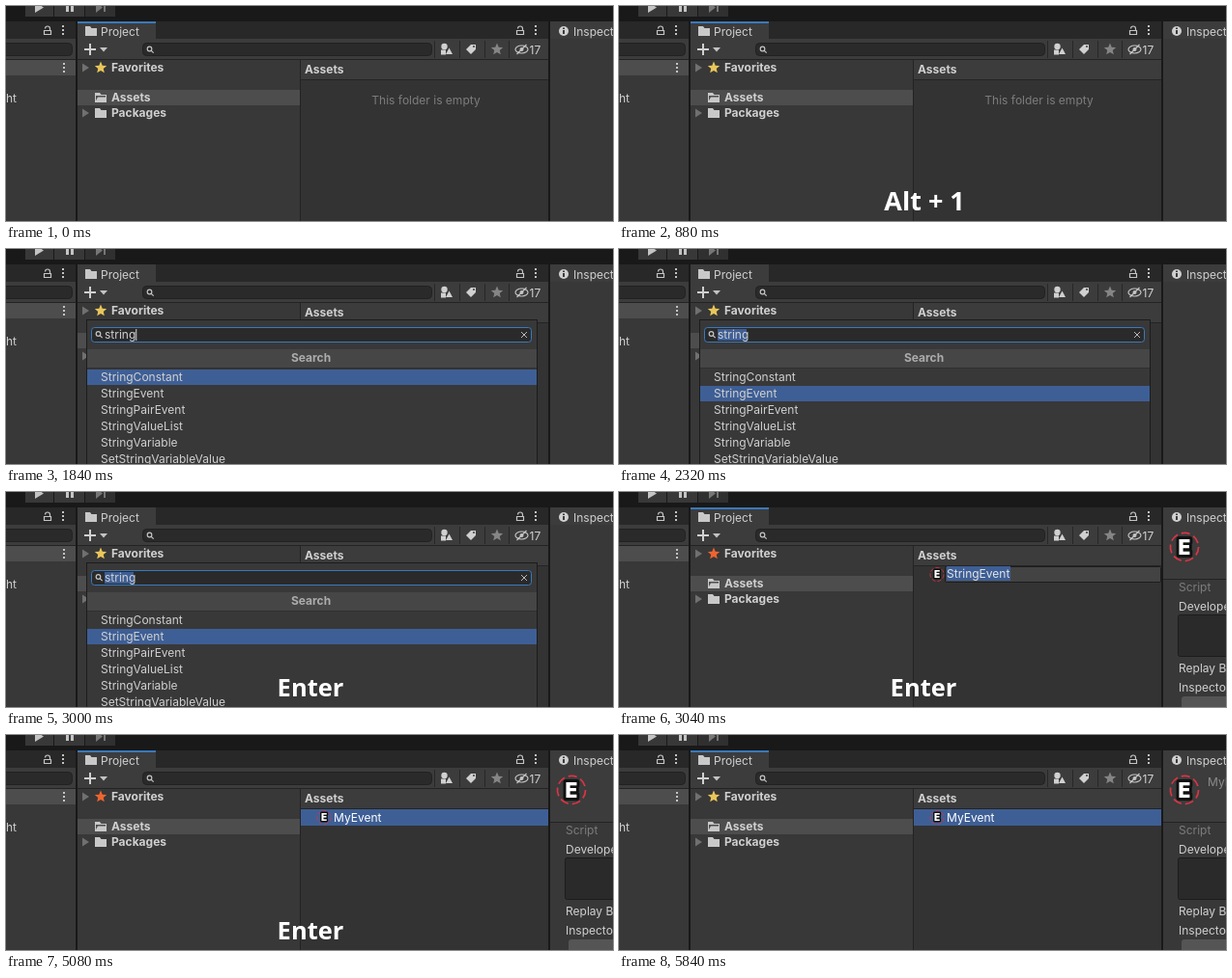
An HTML page with a canvas that plays this animation: 628x223 px, repeating every 6.56 s.

```html
<!DOCTYPE html>
<html lang="en">
<head>
<meta charset="utf-8">
<title>Creating an event asset</title>
<style>
  html, body { margin: 0; width: 100%; height: 100%; overflow: hidden; background: #191919; }
  canvas { display: block; }
</style>
</head>
<body>
<canvas id="stage" width="628" height="223"></canvas>
<script>
const ctx = document.getElementById('stage').getContext('2d');
const LOOP = 6560;
const BLUE = '#3e5f96', ACCENT = '#3a79bb', TEXT = '#d0d0d0', FIELD = '#2a2a2a';
const BAR = '#3c3c3c', PANEL = '#383838', DARK = '#191919', ROW = '#4d4d4d';

const SCENE_ROWS = ['SceneFieldConstant', 'SceneFieldEvent', 'SceneFieldPairEvent',
  'SceneFieldValueList', 'SceneFieldVariable', 'SetBoolVariableValue'];
const STRING_ROWS = ['StringConstant', 'StringEvent', 'StringPairEvent',
  'StringValueList', 'StringVariable', 'SetStringVariableValue'];

// Moments at which each further character is typed.
const QUERY_KEYS = [1320, 1480, 1560, 1640, 1760, 1840];
const NAME_KEYS = [3840, 4000, 4240, 4320, 4440, 4520, 4600];
const typed = (word, keys, t) => word.slice(0, keys.filter(k => k <= t).length);
const between = (t, from, to) => t >= from && t < to;

function rect(x, y, w, h, color) {
  ctx.fillStyle = color;
  ctx.fillRect(x, y, w, h);
}

function text(str, x, y, { color = TEXT, weight = 400, size = 12, align = 'left', family = 'Inter' } = {}) {
  ctx.font = `${weight} ${size}px ${family}, sans-serif`;
  ctx.textAlign = align;
  ctx.fillStyle = color;
  ctx.fillText(str, x, y);
  return ctx.measureText(str).width;
}

function polygon(points, color) {
  ctx.beginPath();
  points.forEach(([x, y]) => ctx.lineTo(x, y));
  ctx.closePath();
  ctx.fillStyle = color;
  ctx.fill();
}

function stroke(color, width, build) {
  ctx.beginPath();
  build();
  ctx.strokeStyle = color;
  ctx.lineWidth = width;
  ctx.stroke();
}

function disc(x, y, r, color) {
  ctx.beginPath();
  ctx.arc(x, y, r, 0, 7);
  ctx.fillStyle = color;
  ctx.fill();
}

function field(x, y, w, h, radius, border, fill = FIELD) {
  ctx.beginPath();
  ctx.roundRect(x + .5, y + .5, w - 1, h - 1, radius);
  ctx.fillStyle = fill;
  ctx.fill();
  ctx.strokeStyle = border;
  ctx.lineWidth = 1;
  ctx.stroke();
}

function star(x, y, r, color) {
  polygon(Array.from({ length: 10 }, (_, i) => {
    const a = i * Math.PI / 5 - Math.PI / 2, d = i % 2 ? r * .45 : r;
    return [x + d * Math.cos(a), y + d * Math.sin(a)];
  }), color);
}

function folder(x, y, open) {
  polygon([[x, y], [x + 5, y], [x + 6.5, y + 2], [x + 12, y + 2], [x + 12, y + 10], [x, y + 10]], '#c8c8c8');
  if (open) polygon([[x + 1, y + 3], [x + 11, y + 3], [x + 11, y + 4.5], [x + 3, y + 4.5], [x + 1, y + 8]], ROW);
}

function magnifier(x, y) {
  stroke('#c4c4c4', 1.2, () => {
    ctx.arc(x, y, 2.3, 0, 7);
    ctx.moveTo(x + 1.8, y + 1.8);
    ctx.lineTo(x + 4.2, y + 4.2);
  });
}

function kebab(x, y) {
  [-4, 0, 4].forEach(d => rect(x - 1, y + d - 1, 2, 2, '#c4c4c4'));
}

function lock(x, y) {
  stroke('#c4c4c4', 1.2, () => {
    ctx.rect(x - 3.5, y, 7, 4);
    ctx.moveTo(x + 2.5, y);
    ctx.lineTo(x + 2.5, y - 2);
    ctx.arc(x, y - 2, 2.5, 0, Math.PI, true);
  });
}

function fold(x, y) {
  polygon([[x - 3, y - 4.5], [x + 4, y], [x - 3, y + 4.5]], '#707070');
}

function eventIcon(x, y, r) {
  for (let i = 0; i < 7; i++) {
    const start = i * Math.PI * 2 / 7;
    stroke('#dc3445', r * .11, () => ctx.arc(x, y, r * .94, start, start + .62));
  }
  const size = r * 1.35, base = y + size * .364;
  ctx.font = `900 ${size}px Inter, sans-serif`;
  ctx.textAlign = 'center';
  ctx.lineJoin = 'round';
  ctx.strokeStyle = '#111';
  ctx.lineWidth = r * .38;
  ctx.strokeText('E', x, base);
  text('E', x, base, { weight: 900, size, align: 'center', color: '#fff' });
}

function drawTopBar() {
  rect(0, 0, 628, 223, DARK);
  rect(20, 0, 29, 11, PANEL);
  rect(50, 0, 31, 11, PANEL);
  rect(82, 0, 31, 11, '#303030');
  polygon([[30, -4], [39, 1.5], [30, 7]], '#c4c4c4');
  rect(62, 0, 3, 6, '#c4c4c4');
  rect(67, 0, 3, 6, '#c4c4c4');
  polygon([[93, -4], [100, 1.5], [93, 7]], '#767676');
  rect(101, 0, 2, 6, '#767676');
}

function drawHierarchy() {
  rect(0, 16, 72, 18, '#282828');
  rect(0, 34, 72, 189, PANEL);
  rect(0, 34, 72, 21, BAR);
  rect(0, 55, 72, 1, '#232323');
  lock(43, 25.5);
  kebab(59, 25);
  field(-10, 38, 79, 14, 4, '#212121');
  rect(0, 56, 72, 16, ROW);
  kebab(60, 64);
  text('ht', 0, 100);
}

function drawToolbarIcons() {
  [443, 469, 495, 520].forEach(x => rect(x, 36, 1, 18, '#272727'));
  disc(453.5, 42, 3.2, TEXT);
  rect(450, 45.5, 5, 5, TEXT);
  polygon([[455, 50], [458.5, 43.5], [462, 50]], TEXT);
  polygon([[476, 45], [481, 40], [486, 40], [486, 45], [481, 50]], TEXT);
  disc(484, 42, 1, BAR);
  star(508, 45, 6.5, '#858585');
  stroke('#c4c4c4', 1.2, () => {
    ctx.ellipse(533.5, 45, 6.5, 4, 0, 0, 7);
    ctx.moveTo(528.5, 50);
    ctx.lineTo(538.5, 40);
  });
  disc(533.5, 45, 2, '#c4c4c4');
  text('17', 541.5, 49.5);
}

function drawProject(focused, orangeStar) {
  rect(74, 16, 487, 18, '#282828');
  rect(74, 16, 81, 18, BAR);
  if (focused) rect(74, 16, 81, 2, ACCENT);
  folder(82, 21);
  text('Project', 98, 31);
  lock(532, 25.5);
  kebab(548, 25);

  rect(74, 34, 487, 21, BAR);
  rect(74, 55, 487, 1, '#232323');
  rect(81, 44, 12, 2, TEXT);
  rect(86, 39, 2, 12, TEXT);
  polygon([[97, 43], [105, 43], [101, 47.5]], '#c4c4c4');
  field(141, 38, 300, 14, 4, '#212121');
  magnifier(148.5, 44.5);
  drawToolbarIcons();

  rect(74, 56, 230, 167, PANEL);
  rect(74, 87, 230, 16, ROW);
  fold(82, 64);
  star(98, 64, 6.5, orangeStar ? '#ee6530' : '#e9c65a');
  text('Favorites', 109, 68, { weight: 700 });
  folder(92, 90, true);
  text('Assets', 109, 99, { weight: 700 });
  fold(82, 111);
  folder(92, 106);
  text('Packages', 109, 115, { weight: 700 });

  rect(304, 56, 1, 167, '#232323');
  rect(305, 56, 256, 167, '#333');
  rect(305, 56, 256, 20, BAR);
  rect(305, 76, 256, 1, '#242424');
  text('Assets', 309, 70, { weight: 700 });
}

function drawInspector(hasAsset, hasTitle) {
  rect(563, 16, 65, 18, BAR);
  rect(563, 34, 65, 189, PANEL);
  disc(577, 26, 5, '#d0d0d0');
  rect(576, 25, 2, 4, BAR);
  rect(576, 22.5, 2, 1.5, BAR);
  text('Inspector', 587, 31);
  if (!hasAsset) return;

  rect(563, 34, 65, 56, BAR);
  rect(563, 90, 65, 1, '#222');
  eventIcon(585, 57, 15.5);
  if (hasTitle) text('MyEvent', 609, 53, { color: '#8c8c8c' });
  text('Script', 579, 103, { color: '#7c7c7c' });
  text('Developer Description', 579, 123);
  field(578, 127, 60, 44, 2, '#1c1c1c');
  text('Replay Buffer Size', 579, 187);
  text('Inspector Value', 579, 207);
  ctx.beginPath();
  ctx.roundRect(582, 212, 60, 20, 3);
  ctx.fillStyle = '#555';
  ctx.fill();
}

function drawAsset(t) {
  if (t >= 5080) {
    rect(305, 77, 256, 17, BLUE);
    eventIcon(329, 85.5, 7.5);
    text('MyEvent', 339, 90, { color: '#fff' });
    return;
  }
  eventIcon(329, 85.5, 7.5);
  field(337, 77, 224, 17, 1, '#1c1c1c', '#434343');
  const name = typed('MyEvent', NAME_KEYS, t);
  if (name) {
    const width = text(name, 339, 89, { color: '#e4e4e4' });
    rect(339 + width, 78, 1, 13, '#e4e4e4');
  } else {
    rect(339, 77, 66, 15, BLUE);
    text('StringEvent', 339, 89, { color: '#e4e4e4' });
  }
}

function drawPopup(t) {
  const query = typed('string', QUERY_KEYS, t);
  const chosen = t >= 2320;
  rect(83, 73, 467, 150, '#1c1c1c');
  rect(84, 74, 465, 149, PANEL);

  field(88, 81, 456, 16, 3, ACCENT);
  magnifier(95.5, 88);
  if (chosen) rect(102, 83, 30, 12, BLUE);
  const width = text(query, 102, 93);
  if (!chosen) rect(102 + width, 83, 1, 12, TEXT);
  stroke('#b8b8b8', 1, () => {
    ctx.moveTo(533, 86); ctx.lineTo(539, 92);
    ctx.moveTo(539, 86); ctx.lineTo(533, 92);
  });

  rect(84, 104, 465, 19, '#464646');
  rect(84, 123, 465, 1, '#303030');
  text('Search', 315.5, 117, { weight: 700, align: 'center', color: '#acacac' });
  if (!query) return;

  const wide = query.length > 1;
  rect(84, 125 + (chosen ? 17 : 0), wide ? 465 : 453, 16, BLUE);
  (wide ? STRING_ROWS : SCENE_ROWS).forEach((row, i) => text(row, 98, 137 + 17 * i));
  if (!wide) {
    rect(537, 125, 12, 98, '#323232');
    polygon([[539, 134], [543, 130], [547, 134]], '#c0c0c0');
    ctx.beginPath();
    ctx.roundRect(538, 140, 10, 110, 5);
    ctx.fillStyle = '#5e5e5e';
    ctx.fill();
  }
}

function drawKeyHint(t) {
  const style = { weight: 700, align: 'center', color: '#fff', family: '"Open Sans"' };
  if (between(t, 880, 1640)) text('Alt + 1', 316, 212, { ...style, size: 27 });
  if (between(t, 3000, 3760) || between(t, 5080, 5840)) text('Enter', 315, 212, { ...style, size: 25.5 });
}

function draw(t) {
  const popupOpen = between(t, 920, 3040);
  const created = t >= 3040;
  drawTopBar();
  drawHierarchy();
  drawProject(!popupOpen, between(t, 3040, 5840));
  drawInspector(created, t >= 5120);
  if (created) drawAsset(t);
  else text('This folder is empty', 434.5, 102, { align: 'center', color: '#7d7d7d' });
  if (popupOpen) drawPopup(t);
  drawKeyHint(t);
}

const began = performance.now();
function tick() {
  draw((performance.now() - began) % LOOP);
  requestAnimationFrame(tick);
}
tick();
</script>
</body>
</html>
```
